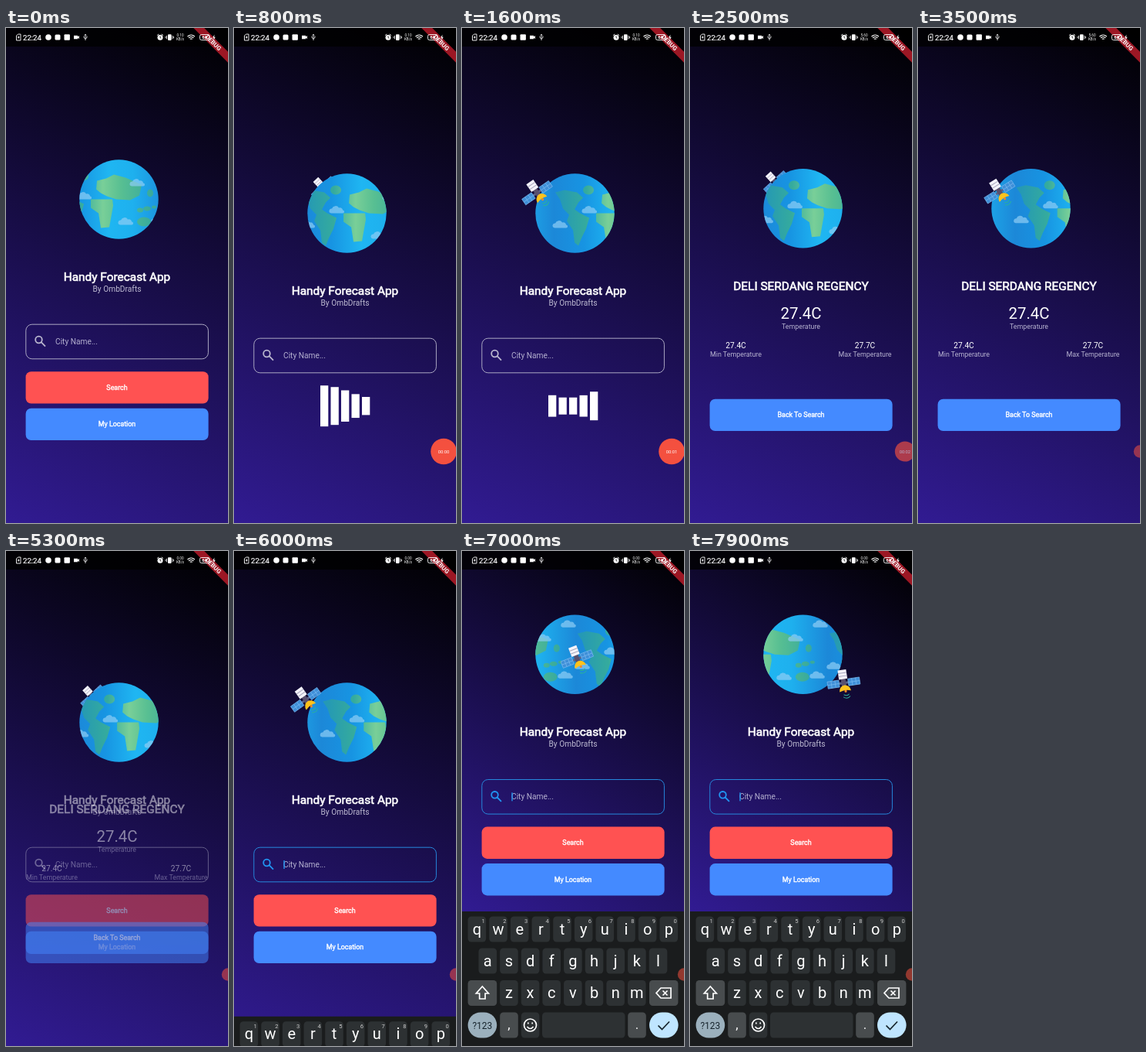
Recreate the animation shown at these times as an HTML page. Size 288 px wide and 640 px high, loop 8000 ms.

```html
<!DOCTYPE html>
<html lang="en">
<head>
<meta charset="utf-8">
<title>Weather app</title>
<style>
html, body { margin: 0; width: 100%; height: 100%; overflow: hidden; background: #000; }
svg { display: block; width: 288px; height: 640px; font-family: Roboto, "Noto Sans", sans-serif; fill: #fff; }
.mid { text-anchor: middle; }
.title { font-size: 15.4px; stroke: #fff; stroke-width: .6; }
.soft { fill: #b5b1cf; font-size: 8.9px; }
.btn { font-size: 8.9px; stroke: #fff; stroke-width: .4; }
.line { fill: none; stroke: #fff; }
</style>
</head>
<body>
<svg viewBox="0 0 288 640">
  <defs>
    <linearGradient id="night" gradientUnits="userSpaceOnUse" x1="288" y1="0" x2="0" y2="640">
      <stop stop-color="#000"/><stop offset="1" stop-color="#311b92"/>
    </linearGradient>
    <linearGradient id="sea" gradientUnits="userSpaceOnUse" x1="0" y1="0" x2="157" y2="0" spreadMethod="repeat">
      <stop stop-color="#1c88d8"/><stop offset=".25" stop-color="#1794e2"/><stop offset=".5" stop-color="#1fb6f2"/>
      <stop offset=".7" stop-color="#1eb0ee"/><stop offset="1" stop-color="#1c88d8"/>
    </linearGradient>
    <linearGradient id="soil" gradientUnits="userSpaceOnUse" x1="0" y1="0" x2="157" y2="0">
      <stop offset=".05" stop-color="#2599b4"/><stop offset=".27" stop-color="#35ab9d"/><stop offset=".45" stop-color="#79cf98"/>
      <stop offset=".6" stop-color="#58bf92"/><stop offset=".85" stop-color="#38aa9c"/>
    </linearGradient>
    <clipPath id="disc"><circle r="51.2"/></clipPath>
    <path id="cloud" d="M-8 3a3 3 0 0 1 1-6 5 5 0 0 1 9-1 3.5 3.5 0 0 1 5 3 2 2 0 0 1 0 4z" fill="#8fcdf5" opacity=".7"/>
    <g id="land">
      <g fill="url(#soil)">
        <path d="M62-13 63-24 75-27 85-32 100-28 121-19 118-5 106 1 88 0 76-4 68-8z"/>
        <path d="M55 0 83 0 84 8 79 36 68 37 65 18 55 11z"/>
        <path d="M2-27 14-30 30-27 38-20 32-14 27-5 34 0 46 6 42 20 36 32 32 42 27 38 25 22 17 10 20 2 12-6 8-18z"/>
        <ellipse cx="45" cy="-30" rx="7" ry="6"/>
        <ellipse cx="124" cy="29" rx="9" ry="6"/>
        <ellipse cx="132" cy="-8" rx="4" ry="5"/>
        <ellipse cx="128" cy="12" rx="5" ry="3"/>
        <ellipse cx="119" cy="14" rx="4" ry="3"/>
        <ellipse cx="137" cy="10" rx="3" ry="2"/>
      </g>
      <use href="#cloud" x="47" y="-3"/><use href="#cloud" x="116" y="-20"/>
      <use href="#cloud" x="101" y="30"/><use href="#cloud" x="9" y="16"/>
      <use href="#cloud" x="148" y="-38"/><use href="#cloud" x="144" y="28"/>
    </g>
  </defs>

  <rect width="288" height="640" fill="url(#night)"/>

  <g id="world">
    <g id="ball" clip-path="url(#disc)">
      <g id="skin">
        <rect x="-220" y="-52" width="440" height="104" fill="url(#sea)"/>
        <use href="#land"/><use href="#land" x="-157"/>
      </g>
    </g>
    <g id="sat">
      <path d="M-6 0H6" stroke="#56648f" stroke-width="3"/>
      <g fill="#3f8fd8" stroke="#79b9ee" stroke-width=".7">
        <path d="M-21-4.5h15v9h-15zM-16-4.5v9M-11-4.5v9M-21 0h15"/>
        <path d="M6-4.5h15v9H6zM11-4.5v9M16-4.5v9M6 0h15"/>
      </g>
      <rect x="-3" y="-6" width="6" height="11" fill="#59506e"/>
      <rect x="-5.5" y="-17" width="11" height="12" fill="#f4f3fa"/>
      <path d="M-5.5-13h11M-5.5-9h11" stroke="#a9a7bd"/>
      <path d="M-7 11a7.5 8 0 0 1 15 0q-7 -3-15 0z" fill="#ffc21c"/>
      <circle cx="1" cy="11" r="1.6" fill="#f0872a"/>
      <path d="M-2 15q4 3 7 0M-3 18q5 4 9 0" class="line" style="stroke:#2bb29a"/>
    </g>
  </g>

  <g id="home">
    <g class="mid">
      <text class="title" x="144" y="327">Handy Forecast App</text>
      <text x="144" y="341" font-size="10.2" fill="#bdbad2">By OmbDrafts</text>
    </g>
    <rect id="field" x="25.8" y="383.2" width="236.6" height="44.6" rx="8" class="line"/>
    <g id="lens" fill="none" stroke-width="1.8"><circle cx="42.5" cy="403" r="4.3"/><path d="M45.6 406.2 51 411.6"/></g>
    <text x="64" y="408.5" font-size="10.2" fill="#b3afcf">City Name...</text>
    <rect id="caret" x="64.3" y="400" width="1.4" height="11" fill="#2196f3"/>
    <g id="buttons" class="mid btn">
      <rect x="25.6" y="444.3" width="237" height="41.3" rx="7" fill="#ff5252" stroke="none"/>
      <text x="144" y="467.8">Search</text>
      <rect x="25.6" y="491.8" width="237" height="41.3" rx="7" fill="#448aff" stroke="none"/>
      <text x="144" y="515.4">My Location</text>
    </g>
    <g id="loader"></g>
  </g>

  <g id="result" class="mid">
    <text class="title" x="144" y="339">DELI SERDANG REGENCY</text>
    <text x="144" y="376" font-size="20.4">27.4C</text>
    <text x="144" y="389" class="soft">Temperature</text>
    <g font-size="10.2"><text x="59.5" y="414.2">27.4C</text><text x="227" y="414.2">27.7C</text></g>
    <text x="59.5" y="425" class="soft">Min Temperature</text>
    <text x="227" y="425" class="soft">Max Temperature</text>
    <rect x="25.6" y="479.8" width="237" height="41.3" rx="7" fill="#448aff"/>
    <text x="144" y="503.4" class="btn">Back To Search</text>
  </g>

  <rect width="288" height="24" opacity=".8" fill="#000"/>
  <g transform="translate(288 0) rotate(45)" class="mid">
    <rect x="-44" y="21.8" width="88" height="9.8" fill="#9c1724"/>
    <text y="29.6" font-size="7.9" font-weight="700">DEBUG</text>
  </g>

  <text x="22" y="15.6" font-size="9.6" stroke="#fff" stroke-width=".2">22:24</text>
  <path d="M13.5 10 15.5 8H19v8h-5.5zM16.3 10.5v3M15 12h2.6" class="line" stroke-width=".9"/>
  <circle cx="55" cy="12" r="3.8"/>
  <rect x="63.5" y="8.5" width="7" height="7" rx="1.5"/>
  <rect x="75.5" y="8.3" width="7.4" height="7.4" rx="1"/>
  <path d="M88 9.8h5v1.4l2-1.2v4l-2-1.2v1.4h-5z"/>
  <path d="M103 16V8.5M101 10.5v2l2 1.5 2-1.5v-2M102 9.5l1-1.5 1 1.5" class="line" stroke-width=".8"/>
  <circle cx="200" cy="12.3" r="3.5"/>
  <path d="M200 10.3v2.2l1.4.8" class="line" style="stroke:#000" stroke-width=".8"/>
  <path d="M196.2 9.6l2-1.8M203.8 9.6l-2-1.8" class="line"/>
  <rect x="210" y="8.3" width="4.6" height="7.6" rx=".8"/>
  <path d="M208.5 9.8v4.5M216 9.8v4.5M207 10.8v2.5M217.5 10.8v2.5" class="line" stroke-width=".8"/>
  <g class="mid" font-size="4.6"><text id="rate" x="226" y="11.3"></text><text x="226" y="16">KB/s</text></g>
  <path d="M235.5 11q4.7-4 9.4 0M237 12.8q3.2-2.6 6.4 0M238.7 14.4q1.5-1.2 3 0" class="line" stroke-width="1.2"/>
  <rect x="251.5" y="8.5" width="12.5" height="7" rx="2" class="line" stroke-width=".9"/>
  <text x="257.7" y="14.2" font-size="6" font-weight="700" class="mid">68</text>
  <path d="M270.5 8.5l-2.5 4h1.6l-.6 3.5 2.7-4.3H270z"/>

  <g id="keys"></g>

  <g id="bubble" class="mid">
    <circle cy="547.5" fill="#f4503f"/>
    <text y="549.6" font-size="5.8"></text>
  </g>
</svg>
<script>
const $ = id => document.getElementById(id);
const set = (el, attrs) => { for (const k in attrs) el.setAttribute(k, attrs[k]); };
const add = (parent, tag, attrs, text = '') => {
  const el = document.createElementNS('http://www.w3.org/2000/svg', tag);
  set(el, attrs);
  el.textContent = text;
  return parent.appendChild(el);
};
const ramp = (t, a, b) => Math.min(1, Math.max(0, (t - a) / (b - a)));
const mod = (a, n) => ((a % n) + n) % n;

// Keyboard, laid out from its own top edge
const keys = $('keys'), PLAIN = '#2d3133', GREY = '#484c4e';
const key = (x, y, w, fill = PLAIN, rx = 4.5) => add(keys, 'rect', { x, y, width: w, height: 33, rx, fill });
const label = (x, y, size, text, fill = '#fff') =>
  add(keys, 'text', { x, y, 'font-size': size, fill, class: 'mid' }, text);
const icon = (d, stroke = '#fff') => add(keys, 'path', { d, fill: 'none', stroke, 'stroke-width': 1.7 });

add(keys, 'rect', { width: 288, height: 174, fill: '#1a1c1d' });
[['qwertyuiop', 19.4, 6.5], ['asdfghjkl', 33.3, 47.5], ['zxcvbnm', 60.9, 89]].forEach(([row, x0, y], r) =>
  [...row].forEach((c, i) => {
    const x = x0 + 27.65 * i;
    key(x - 11.8, y, 23.6);
    label(x, y + 23, 20, c);
    if (!r) label(x + 8.3, y + 8.5, 7.5, (i + 1) % 10, '#ccc');
  }));
key(7.6, 89, 37.6, GREY);
key(243, 89, 37.4, GREY);
icon('M26.4 97l8 9h-4.3v7h-7.4v-7h-4.3z');
icon('M258 99h13v13h-13l-6-6.5zM260.5 102.5l6 6M266.5 102.5l-6 6');
key(7.6, 130.5, 37.6, '#9bb0bd', 16.5);
label(26.4, 151.5, 12, '?123', '#16242c');
key(49.2, 130.5, 23.6, GREY);
label(61, 152, 17, ',');
key(76.8, 130.5, 23.6);
icon('M80.5 147a8 8 0 1 0 16 0a8 8 0 1 0-16 0M84.5 149q4 5 8 0M85.8 143.5v2M91.2 143.5v2');
key(104, 130.5, 107.5);
key(215.2, 130.5, 23.6, GREY);
label(227, 152, 17, '.');
key(243, 130.5, 37.6, '#bfe5ff', 16.5);
icon('M254.5 147.5l5 5 9.5-10', '#16242c');

const bars = [0, 1, 2, 3, 4].map(i => add($('loader'), 'rect', { x: 112 + 13.5 * i, width: 10.3 }));

const LOAD = 700, RESULT = 2050, BACK = 5300, FOCUS = 5900, LIFT = 6300;

// Orbit phase: zero when the satellite passes in front of the middle
const orbit = t => t < RESULT ? -1.1 + 1.6 * (t - 1600) / 1000
  : t < BACK ? .74 + 1.43 * (t - 4600) / 1000
  : .05 + 1.38 * (t - 7000) / 1000;

function drawWorld(phase, cy) {
  // The satellite shrinks and rises while it is behind the globe
  const front = Math.cos(phase) > 0, far = Math.min(0, Math.cos(phase));
  const size = 1 + .25 * far, x = 55 * size * Math.sin(phase), y = .62 * x + 4 + 25 * far;
  const tilt = -22 + 14 * Math.sin(phase) + 15 * far;
  set($('world'), { transform: `translate(146.5 ${cy})` });
  set($('skin'), { transform: `translate(${mod(25 * phase, 157)})` });
  set($('sat'), { transform: `translate(${x} ${y}) rotate(${tilt}) scale(${size})` });
  $('world').append(front ? $('sat') : $('ball'));
}

function draw(t) {
  const onResult = t >= RESULT && t < BACK, loading = t >= LOAD && t < RESULT + 100;
  const focused = t >= FOCUS, lifted = t >= LIFT;
  const shift = loading ? 18 : lifted ? -87.7 : 0;
  drawWorld(orbit(t), onResult ? 233.2 : 221.5 + shift);

  const shown = ramp(t, RESULT - 60, RESULT + 60) * (1 - ramp(t, BACK - 60, BACK + 60));
  set($('result'), { opacity: shown });
  set($('home'), { opacity: 1 - shown, transform: `translate(0 ${shift})` });
  set($('field'), { style: `stroke:${focused ? '#2688dc' : '#aaa7c2'}` });
  set($('lens'), { stroke: focused ? '#2196f3' : '#b9b6ce' });
  set($('caret'), { opacity: +(focused && (t - FOCUS) % 1000 < 500) });
  set($('buttons'), { opacity: +!loading });
  set($('loader'), { opacity: +loading });
  bars.forEach((bar, i) => {
    const angle = (300 * (t - 1600) / 1000 - 90 - 36 * (i - 1.5)) * Math.PI / 180;
    const h = 53 * (.7 + .3 * Math.sin(angle));
    set(bar, { y: 470.7 - h / 2, height: h });
  });

  set($('keys'), { transform: `translate(0 ${640 - 174 * ramp(t, FOCUS, LIFT + 60)})` });
  set($('night'), { y2: lifted ? 466 : 640 });
  $('rate').textContent = t < RESULT ? '0.10' : t < BACK ? '5.60' : '0.00';

  const tuck = ramp(t, 2350, 2700), bx = 272 + 16 * tuck;
  const [dot, clock] = $('bubble').children;
  set($('bubble'), { opacity: t < 500 ? 0 : 1 - .45 * ramp(t, 2350, 2550) });
  set(dot, { cx: bx, r: 16.8 - 8.6 * tuck });
  set(clock, { x: bx, opacity: +(tuck < .8) });
  clock.textContent = '00:0' + (t < 1500 ? 0 : t < 2450 ? 1 : 2);
}

function tick(now) {
  draw(now % 8000);
  requestAnimationFrame(tick);
}
draw(0);
requestAnimationFrame(tick);
</script>
</body>
</html>
```
